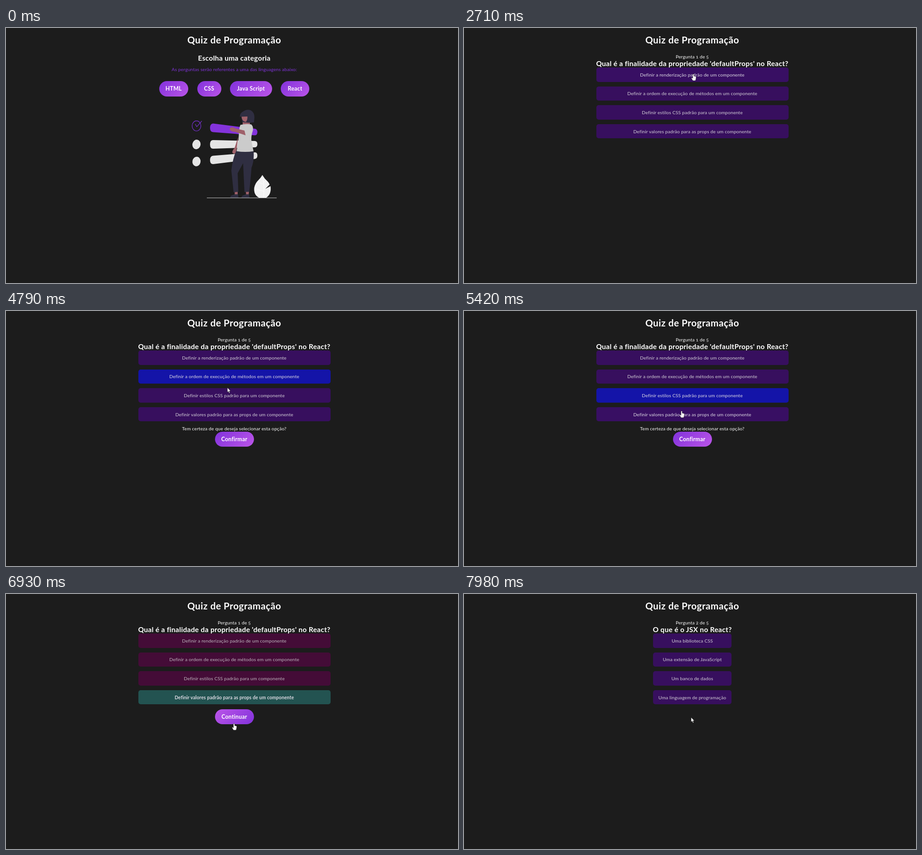
Recreate the animation shown at these times as an HTML page. Size 997 by 562 pixels, loop 8 s.

```html
<!DOCTYPE html>
<html lang="pt-BR">
<head>
<meta charset="utf-8">
<title>Quiz de Programação</title>
<style>
  html, body { margin: 0; width: 100%; height: 100%; overflow: hidden; background: #1c1c1c; }
  body {
    position: relative; color: #fafafa;
    font: 400 10.4px Lato, sans-serif; font-variant-numeric: oldstyle-nums;
  }
  div, svg { position: absolute; }
  .scene { inset: 0; }
  .text, .button, .option {
    display: flex; align-items: center; justify-content: center;
    white-space: nowrap; letter-spacing: .011em;
  }
  .title, .heading { font-weight: 700; color: #fff; }
  .title { font-size: 20.8px; letter-spacing: .023em; }
  .heading { font-size: 15.6px; letter-spacing: .0178em; }
  .hint { color: #8033da; }
  .button {
    border-radius: 17px; font-size: 12.4px; font-weight: 700; color: #fff;
    letter-spacing: .018em;
    background: linear-gradient(135deg, #8232db, #bb55e8);
  }
  .button.hover { background: linear-gradient(135deg, #bb55e8, #8232db); }
  .option { border-radius: 5px; background: #370f5e; color: #d4d0d8; }
</style>
</head>
<body>
<div class="scene" id="start">
  <svg width="997" height="562">
    <g fill="none" stroke="#7c32d8" stroke-width="1.2">
      <ellipse cx="420.2" cy="215.8" rx="9.7" ry="11.2"/>
      <path d="M417.4 211.8L420.8 217.6L432 204.8"/>
    </g>
    <g fill="#e5e5e5">
      <ellipse cx="420.2" cy="256.6" rx="9" ry="10.6" transform="rotate(10 420 256)"/>
      <ellipse cx="420.2" cy="294.2" rx="9" ry="10.6" transform="rotate(10 420 294)"/>
      <path d="M457 247L549 249Q554.5 249.5 554.5 256T549 263L457 266Q450 266 450 256.5T457 247Z"/>
      <path d="M457 281.5L549 274Q554.5 274 554.5 281T549 288.5L457 300Q450 300 450 291T457 281.5Z"/>
    </g>
    <path fill="#8433dc" d="M457 210.5L549 222Q554.5 223 554.5 229.5T549 236.5L457 229.5Q450 229 450 220T457 210.5Z"/>
    <g fill="#9f616a">
      <path d="M512 240L509.5 262L507 275Q502 280 499 274Q500 268 504 265Z"/>
      <path d="M504.5 360h6.5v8h-6.5zM529 360h7l-.8 8h-5.5z"/>
      <path d="M522 203H538V214H522Z"/>
    </g>
    <g fill="#2f2e41">
      <path d="M508 270H546Q548 292 541.5 308Q539 340 536.5 361L526 361.5L523 298L511 320L512.5 361L502 362Q499 332 497 314Q500 288 508 270Z"/>
      <path d="M495 374Q494 370 499 368.5L505 366.5H511.5L513 374ZM519.5 374Q519 370 524 368.5L529 366.5H535.5L537.5 374Z"/>
    </g>
    <path fill="#cbcbcb" d="M517 213.5Q530 210.5 541 212.5Q546 217 544.5 226Q540 239 541.5 250L546 271.5Q528 274.5 508.5 271.5Q513 250 513.5 236Q514 220 517 213.5Z"/>
    <path fill="#9f616a" d="M500 218.7Q493 219 493.5 224Q497 229 505 228.8L528.5 236.5L526 226L507 221.5Z"/>
    <path fill="#2f2e41" d="M515.8 196Q516 187 523 184Q531 178 540 181.5Q548 186 548 197L547 208Q533 209.5 521 207.5L519 195Z"/>
    <path fill="#9f616a" d="M519.5 195.5L532.5 195Q533 203 529 207Q520.5 206 519.5 195.5Z"/>
    <path fill="#f2f2f2" d="M565.5 324Q570 332 577 338Q580 341 581.5 345L572 354.5L583.5 348.5Q586 366 574 374H558Q546 368 547.5 352Q550 341 557 335Q562 330 565.5 324Z"/>
    <path fill="none" stroke="#fff" stroke-width=".8" d="M565.5 325Q571 350 568 374M567.5 340L576 337.5M567 344L555 339M569 360L549 354"/>
    <path stroke="#c6c6c6" d="M443 374.4H597"/>
  </svg>
</div>
<div class="scene" id="first"></div>
<div class="scene" id="second"></div>
<svg width="997" height="562">
  <g id="cursor" stroke="#222" stroke-width=".6" stroke-linejoin="round" fill="#fff">
    <path id="arrow" d="M0 0V10L2.3 8L4 12L5.6 11.3L4 7.5L7 7.3Z"/>
    <path id="hand" d="M-1.3 1Q0 -.6 1.3 1V5L4.5 5.7Q6 6 6 7.5L5.6 11L4.5 15H-1.2L-4.2 10Q-4.6 8.3 -3 8.5L-1.3 10Z"/>
  </g>
</svg>
<script>
const LOOP = 8000, OPEN = 2030, ASK = 2860, VERDICT = 6720, NEXT = 7430;
const CENTER = 503.5;
const $ = id => document.getElementById(id);
const start = $('start'), first = $('first'), second = $('second');

function put(parent, kind, x, y, w, h, label) {
  const el = document.createElement('div');
  el.className = kind;
  el.textContent = label;
  Object.assign(el.style, { left: x + 'px', top: y + 'px', width: w + 'px', height: h + 'px' });
  parent.append(el);
  return { el, x, y, w, h };
}
const line = (parent, kind, y, label) =>
  put(parent, 'text ' + kind, CENTER - 300, y - 15, 600, 30, label);
const button = (parent, x, y, w, label) => put(parent, 'button', x, y, w, 33.5, label);

function quiz(parent, count, question, width, answers) {
  line(parent, '', 63, count);
  line(parent, 'heading', 77.5, question);
  return answers.map((label, i) =>
    put(parent, 'option', CENTER - width / 2, 87 + i * 41.65, width, 31.5, label));
}

line(document.body, 'title', 25.7, 'Quiz de Programação');
line(start, 'heading', 65.8, 'Escolha uma categoria');
line(start, 'hint', 90.7, 'As perguntas serão referentes a uma das linguagens abaixo:');
const categories = [
  button(start, 338, 117, 63.5, 'HTML'),
  button(start, 421.5, 117, 53, 'CSS'),
  button(start, 494, 117, 92.5, 'Java Script'),
  button(start, 606, 117, 63, 'React')
];
const options = quiz(first, 'Pergunta 1 de 5',
  "Qual é a finalidade da propriedade 'defaultProps' no React?", 424, [
    'Definir a renderização padrão de um componente',
    'Definir a ordem de execução de métodos em um componente',
    'Definir estilos CSS padrão para um componente',
    'Definir valores padrão para as props de um componente'
  ]);
const sure = line(first, '', 259.3, 'Tem certeza de que deseja selecionar esta opção?');
const confirm = button(first, 460.5, 265.5, 86, 'Confirmar');
const proceed = button(first, 460.5, 253.7, 86, 'Continuar');
quiz(second, 'Pergunta 2 de 5', 'O que é o JSX no React?', 172.5, [
  'Uma biblioteca CSS', 'Uma extensão de JavaScript',
  'Um banco de dados', 'Uma linguagem de programação'
]);

// time, x, y of the pointer tip
const path = [
  [340, 908, 506], [890, 533, 138], [1470, 533, 138], [1630, 617, 122],
  [2080, 617, 122], [2700, 506, 101], [2790, 506, 102], [3800, 506, 102],
  [3980, 493.5, 142], [4150, 492, 155], [4300, 492, 155], [4600, 491, 141],
  [4650, 491, 141], [4880, 487, 183], [5120, 487, 185], [5420, 480, 220],
  [5720, 480, 221], [6200, 503, 284], [6720, 503, 284], [6900, 503, 285],
  [7430, 503, 285], [7900, 501, 272]
];
// click time, chosen option
const picks = [[2840, 0], [4230, 1], [4930, 2], [5620, 3]];
const BASE = [55, 15, 94], HOVER = [56, 15, 99], PICKED = [20, 20, 168];
const WRONG = [76, 11, 32], RIGHT = [44, 120, 30];
const INK = [212, 208, 216], DIM = [178, 168, 176], LIT = [222, 219, 228];

const clamp = k => Math.min(1, Math.max(0, k));
const easeOut = k => 1 - (1 - clamp(k)) ** 2.2;
const mix = (a, b, k) => a.map((v, i) => v + (b[i] - v) * k);
const rgb = c => `rgb(${c.map(Math.round)})`;
const show = (el, on) => { el.style.display = on ? '' : 'none'; };

function tip(t) {
  const i = path.findIndex(p => p[0] > t);
  if (i < 0) return path.at(-1).slice(1);
  if (i === 0) return path[0].slice(1);
  const a = path[i - 1], b = path[i], k = (t - a[0]) / (b[0] - a[0]);
  return mix(a.slice(1), b.slice(1), k * k * (3 - 2 * k));
}

function paintOption(o, i, t, over) {
  const done = t >= VERDICT, right = i === 3;
  let back = over && !done ? HOVER : BASE, picked = 0;
  picks.forEach(([at, n]) => {
    picked += ((n === i ? 1 : 0) - picked) * easeOut((t - at) / 300);
  });
  back = mix(back, PICKED, picked);
  let ink = mix(over ? LIT : INK, LIT, picked);
  const k = easeOut((t - VERDICT - 30) / 500);
  back = mix(back, right ? RIGHT : WRONG, k);
  if (!right) ink = mix(ink, DIM, k);
  o.el.style.background = rgb(back);
  o.el.style.color = rgb(ink);
  o.el.style.fontWeight = done && right ? 700 : 400;
}

function render(t) {
  const [x, y] = tip(t);
  const inside = r => t >= 340 && x >= r.x && x <= r.x + r.w && y >= r.y && y <= r.y + r.h;
  const asking = t >= ASK && t < VERDICT, done = t >= VERDICT;
  show(start, t < OPEN);
  show(first, t >= OPEN && t < NEXT);
  show(second, t >= NEXT);
  show(sure.el, asking);
  show(confirm.el, asking);
  show(proceed.el, done);

  let live = [];
  if (t < OPEN) live = categories;
  else if (t < NEXT) live = [...options, ...(asking ? [confirm] : done ? [proceed] : [])];
  [...categories, confirm, proceed].forEach(b =>
    b.el.classList.toggle('hover', live.includes(b) && inside(b)));
  options.forEach((o, i) => paintOption(o, i, t, inside(o)));

  const pointing = live.some(inside);
  show($('cursor'), t >= 340);
  show($('hand'), pointing);
  show($('arrow'), !pointing);
  $('cursor').setAttribute('transform', `translate(${x} ${y})`);
}

const began = performance.now();
function tick() {
  render((performance.now() - began) % LOOP);
  requestAnimationFrame(tick);
}
tick();
</script>
</body>
</html>
```
